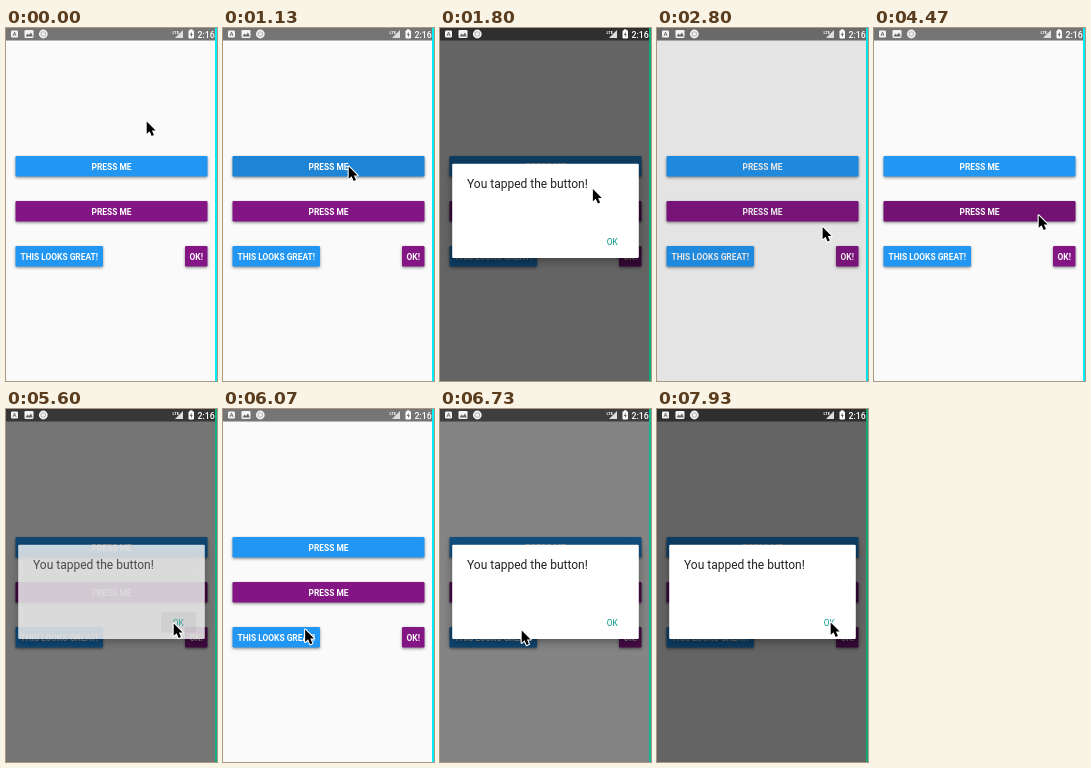
An HTML page with a canvas for the animation above (8 s loop, 211 by 353 pixels).

```html
<!DOCTYPE html>
<html lang="en">
<head>
<meta charset="utf-8">
<title>Button demo</title>
<style>
html, body { margin: 0; width: 100%; height: 100%; overflow: hidden; background: #fafafa; }
canvas { display: block; width: 211px; height: 353px; }
</style>
</head>
<body>
<canvas id="stage" width="211" height="353"></canvas>
<script>
const ctx = document.getElementById('stage').getContext('2d');
const W = 211, H = 353, LOOP = 8000;
const FONT = 'Roboto, sans-serif';
const BLUE = '#2196f3', PURPLE = '#841584';
const MARGIN = 9.5, ROW_TOP = 128, ROW_STEP = 45, BUTTON_H = 20.5;
const FULL = W - 2 * MARGIN;
const BOX = { x: 12.2, y: 135.8, w: 186.6, h: 94.2 };
const ARROW = new Path2D('M.7 .8V13.2L3.6 10.6 5.7 15.4 7.9 14.4 5.9 9.8H9.6Z');

const clamp = v => Math.min(1, Math.max(0, v));
const progress = (t, start, length) => clamp((t - start) / length);
const smooth = p => p * p * (3 - 2 * p);
const easeOut = (p, power) => 1 - (1 - p) ** power;
const mix = (a, b, p) => a + (b - a) * p;

const button = (row, x, w, color, label) =>
  ({ x, y: ROW_TOP + row * ROW_STEP, w, h: BUTTON_H, color, label });
const buttons = [
  button(0, MARGIN, FULL, BLUE, 'PRESS ME'),
  button(1, MARGIN, FULL, PURPLE, 'PRESS ME'),
  button(2, MARGIN, 87.5, BLUE, 'THIS LOOKS GREAT!'),
  button(2, 179, 22.5, PURPLE, 'OK!')
];

// Each tap presses the button of the same index, then opens a dialog
const taps = [
  { press: 800, open: 1130, close: 2620 },
  { press: 3400, open: 4470, close: 5550 },
  { press: 6400, open: 6590, close: Infinity }
];

const move = (start, length, x, y) => ({ start, length, x, y });
const moves = [
  move(70, 400, 125, 137),
  move(1670, 800, 171, 212),
  move(2600, 600, 164, 186),
  move(4930, 400, 167, 213),
  move(5700, 570, 81, 220),
  move(6840, 360, 173, 212)
];

// x settles sooner than y, which bends the path
function pointerAt(t) {
  const at = { x: 140, y: 92 };
  for (const m of moves) {
    const p = progress(t, m.start, m.length);
    at.x = mix(at.x, m.x, easeOut(p, 5));
    at.y = mix(at.y, m.y, easeOut(p, 2));
  }
  return at;
}

function roundRect({ x, y, w, h }, r = 1.2) {
  ctx.beginPath();
  ctx.roundRect(x, y, w, h, r);
}

function fillRound(rect, color, r) {
  ctx.fillStyle = color;
  roundRect(rect, r);
  ctx.fill();
}

function circle(x, y, r, color) {
  ctx.fillStyle = color;
  ctx.beginPath();
  ctx.arc(x, y, r, 0, 2 * Math.PI);
  ctx.fill();
}

function raised(rect, color, alpha, blur, dy) {
  ctx.save();
  ctx.shadowColor = `rgba(0,0,0,${alpha})`;
  ctx.shadowBlur = blur;
  ctx.shadowOffsetY = dy;
  fillRound(rect, color);
  ctx.restore();
}

function text(str, x, y, font, color, align = 'left') {
  ctx.font = `${font} ${FONT}`;
  ctx.fillStyle = color;
  ctx.textAlign = align;
  ctx.fillText(str, x, y);
}

function drawRipple(b, tap, t, pointer) {
  ctx.save();
  roundRect(b);
  ctx.clip();
  ctx.globalAlpha = 0.12 * (1 - progress(t, tap.open + 200, 200));
  circle(pointer.x, pointer.y, mix(10, 165, progress(t, tap.press, 330)), '#000');
  ctx.restore();
}

function drawButton(b, tap, t, pointer) {
  raised(b, b.color, 0.45, 3, 1.3);
  if (tap && t >= tap.press) drawRipple(b, tap, t, pointer);
  text(b.label, b.x + b.w / 2, b.y + 13.7, 'bold 8.4px', '#fff', 'center');
}

function dialogState(t) {
  const tap = taps.find(d => t >= d.open && t < d.close + 240);
  if (!tap) return { scrim: 0, alpha: 0 };
  const shown = smooth(progress(t, tap.open, 130));
  return {
    scrim: smooth(progress(t, tap.open, 200)) * (1 - smooth(progress(t, tap.close, 240))),
    alpha: shown * (1 - smooth(progress(t, tap.close, 170))),
    scale: mix(0.92, 1, shown),
    pressed: t > tap.close - 90
  };
}

function drawDialog({ alpha, scale, pressed }) {
  if (!alpha) return;
  const cx = BOX.x + BOX.w / 2, cy = BOX.y + BOX.h / 2;
  ctx.save();
  ctx.globalAlpha = alpha;
  ctx.translate(cx, cy);
  ctx.scale(scale, scale);
  ctx.translate(-cx, -cy);
  raised(BOX, '#fff', 0.35, 8, 3);
  if (pressed) fillRound({ x: 155, y: 203, w: 35, h: BUTTON_H }, 'rgba(0,0,0,.06)');
  text('You tapped the button!', 27, 159.8, '400 12px', '#212121');
  text('OK', 172.3, 216.8, '400 8.4px', '#009688', 'center');
  ctx.restore();
}

function drawStatusIcons() {
  const light = '#f4f4f4', dim = '#666';
  fillRound({ x: 5, y: 2.5, w: 7, h: 7 }, light);
  text('A', 8.5, 8.2, 'bold 6px', dim, 'center');

  fillRound({ x: 18.5, y: 2, w: 9, h: 8 }, light);
  ctx.fillStyle = dim;
  ctx.fill(new Path2D('M19.5 8.5L21.5 5.5 23 7 25 4.5 26.8 8.5Z'));

  circle(37.3, 6, 4.4, light);
  circle(37.3, 6, 2.8, '#bbb');
  circle(37.3, 6, 1.7, light);

  text('LTE', 166.5, 5.5, 'bold 4px', '#fff');
  ctx.fillStyle = '#ddd';
  ctx.fill(new Path2D('M169 10H177V2Z'));

  fillRound({ x: 184, y: 1.3, w: 2.5, h: 2 }, '#fff', 0);
  fillRound({ x: 182.5, y: 2.3, w: 5.5, h: 8.2 }, '#fff');
  ctx.fillStyle = dim;
  ctx.fill(new Path2D('M185.8 3.5L183.8 7H185V9.3L186.8 6H185.6Z'));
  text('2:16', 208.8, 9.6, '500 8.8px', '#fff', 'right');
}

function drawPointer({ x, y }) {
  ctx.save();
  ctx.translate(x, y + 0.6);
  ctx.lineJoin = 'round';
  ctx.lineWidth = 2.2;
  ctx.strokeStyle = '#fff';
  ctx.stroke(ARROW);
  ctx.fillStyle = '#000';
  ctx.fill(ARROW);
  ctx.restore();
}

function draw(t) {
  const pointer = pointerAt(t);
  const dialog = dialogState(t);
  const { scrim } = dialog;
  ctx.fillStyle = '#fafafa';
  ctx.fillRect(0, 0, W, H);
  ctx.fillStyle = '#757575';
  ctx.fillRect(0, 0, W, 12.5);
  buttons.forEach((b, i) => drawButton(b, taps[i], t, pointer));

  ctx.fillStyle = `rgba(0,0,0,${0.6 * scrim})`;
  ctx.fillRect(0, 0, W, H);
  drawDialog(dialog);
  drawStatusIcons();

  ctx.fillStyle = `rgb(${mix(0, 16, scrim)},${mix(238, 170, scrim)},${mix(246, 120, scrim)})`;
  ctx.fillRect(W - 2, 0, 2, H);
  drawPointer(pointer);
}

function tick() {
  draw(performance.now() % LOOP);
  requestAnimationFrame(tick);
}
tick();
</script>
</body>
</html>
```
